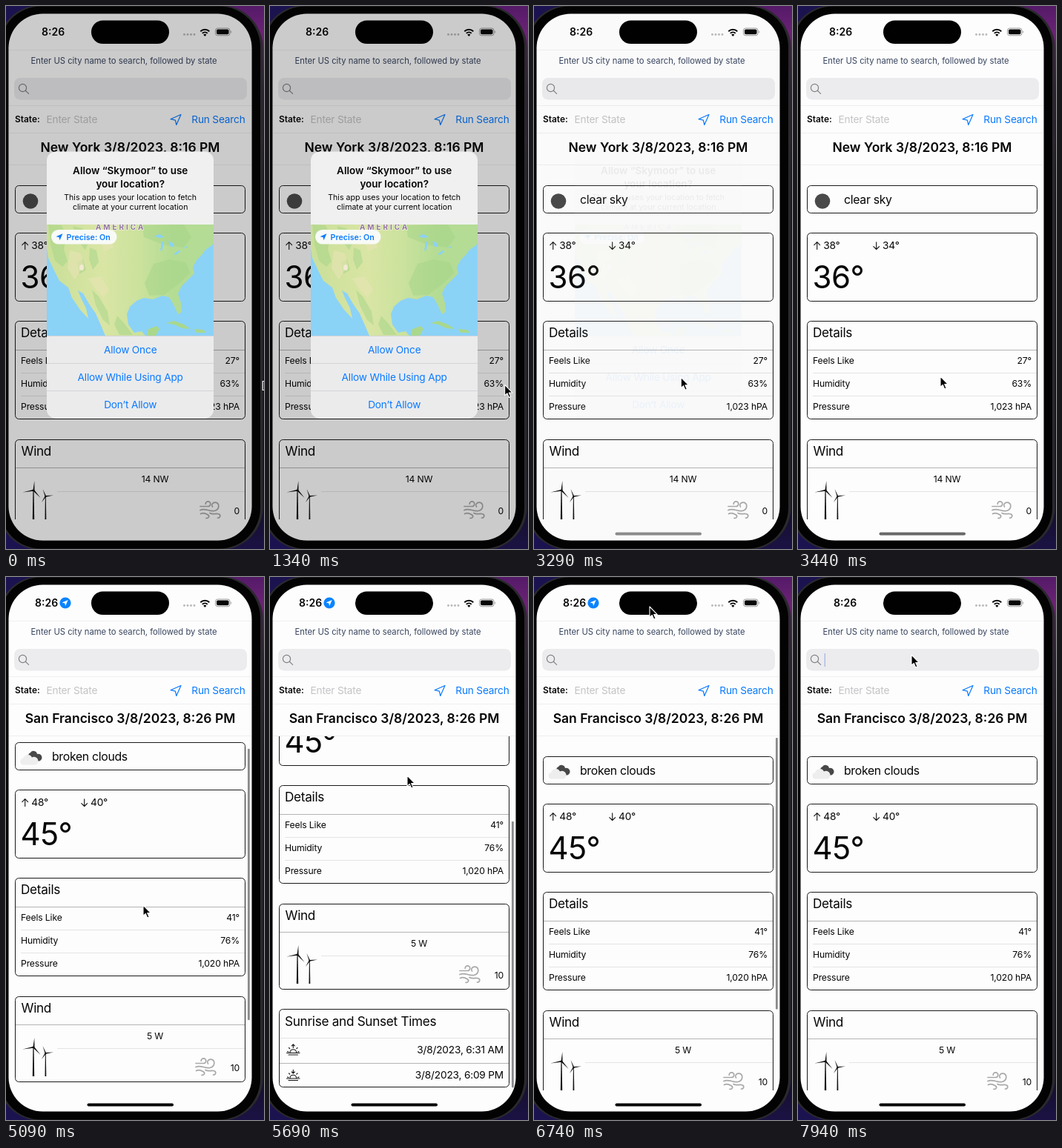
An HTML page for the animation above (8 s loop, 348 by 733 pixels).

```html
<!DOCTYPE html>
<html lang="en">
<head>
<meta charset="utf-8">
<title>Forecast app</title>
<style>
html, body { margin: 0; width: 100%; height: 100%; overflow: hidden; background: #160d2c; }
svg { display: block; width: 348px; height: 733px; }
text { font-family: Inter, Roboto, "Liberation Sans", sans-serif; fill: #050505; white-space: pre; }
.mid { text-anchor: middle; }
.end { text-anchor: end; }
.blue { fill: #0a7aff; }
.body { font-size: 13.7px; letter-spacing: -.2px; }
.small { font-size: 12.2px; letter-spacing: -.15px; }
.head { font-size: 17.2px; letter-spacing: -.3px; }
.sky { font-size: 15.8px; letter-spacing: -.3px; }
.big { font-size: 42px; letter-spacing: -.5px; }
.title { font-size: 17.5px; font-weight: 600; }
.clock { font-size: 14px; font-weight: 600; }
.card { fill: none; stroke: #1a1a1a; stroke-width: 1; }
.rule { stroke: #b4b4b6; stroke-width: 1; }
.thin { stroke: #e4e4e6; stroke-width: 1; }
.faint { stroke: #efeff0; stroke-width: 1; }
.ink { fill: none; stroke: #111; stroke-width: 1.1; stroke-linecap: round; stroke-linejoin: round; }
</style>
</head>
<body>
<svg viewBox="0 0 348 733">
  <defs>
    <linearGradient id="wall" x1="0" y1="0" x2="0" y2="1">
      <stop offset="0" stop-color="#541a68"/>
      <stop offset=".05" stop-color="#6b2274"/>
      <stop offset=".16" stop-color="#381740"/>
      <stop offset=".35" stop-color="#17121f"/>
      <stop offset=".9" stop-color="#130e22"/>
      <stop offset="1" stop-color="#1b1244"/>
    </linearGradient>
    <linearGradient id="land" x1="0" y1="0" x2="1" y2="0">
      <stop offset="0" stop-color="#c9df98"/>
      <stop offset=".35" stop-color="#d9e5a4"/>
      <stop offset=".55" stop-color="#cbe29d"/>
      <stop offset=".75" stop-color="#b4dc93"/>
      <stop offset="1" stop-color="#b4dc96"/>
    </linearGradient>
    <clipPath id="glass"><rect x="3.5" y="10.5" width="328" height="711" rx="46"/></clipPath>
    <clipPath id="listBox"><rect x="4" y="215" width="327" height="478"/></clipPath>
    <clipPath id="alertBox"><rect x="55" y="196.5" width="225" height="360" rx="12"/></clipPath>
    <clipPath id="mapBox"><rect x="55" y="295" width="225" height="150"/></clipPath>
    <path id="plane" d="M14 0L0 6.2L6.4 7.6L7.8 14Z"/>
  </defs>

  <rect width="348" height="733" fill="url(#wall)"/>
  <rect width="174" height="733" fill="#1b1350"/>
  <rect x="-11" y="-1" width="357.5" height="735" rx="57" fill="#2a292d"/>
  <rect x="-8" y=".5" width="351" height="732" rx="55" fill="#030303"/>

  <g clip-path="url(#glass)">
    <rect x="3" y="10" width="329" height="712" fill="#fdfdfd"/>
    <path class="faint" d="M4 59.5H331M4 134.5H331M4 171.5H331M4 214.5H331"/>

    <text x="33.5" y="78" font-size="11.25" style="fill:#38455f">Enter US city name to search, followed by state</text>
    <rect x="11" y="97" width="314" height="29.5" rx="8" fill="#ececee"/>
    <g fill="none" stroke="#828286" stroke-width="1.2" stroke-linecap="round">
      <circle cx="22.5" cy="110.5" r="5.1"/><path d="M26.3 114.3L30.6 118.4"/>
    </g>
    <rect id="caret" x="35.6" y="103" width="1.4" height="18" fill="#4a6be0"/>
    <text x="12" y="157" font-size="11.9" font-weight="600">State:</text>
    <text class="body" x="54.5" y="157.7" style="fill:#c4c4c7">Enter State</text>
    <use href="#plane" x="222" y="146.5" fill="none" stroke="#0a7aff" stroke-width="1.2" stroke-linejoin="round"/>
    <text class="body blue" x="250.3" y="157.7">Run Search</text>
    <text class="title mid" id="title" x="167.5" y="197"></text>

    <g clip-path="url(#listBox)"><g id="list">
      <rect class="card" x="12.5" y="242.5" width="310" height="37" rx="5"/>
      <circle id="moon" cx="33" cy="263.5" r="10.3" fill="#4a4a4a"/>
      <g id="clouds">
        <path d="M32 264a4.5 4.5 0 0 1 1-8a5 5 0 0 1 9 2a4.6 4.6 0 0 1 3 9.5H37Z" fill="#484848"/>
        <path d="M23 272.5a4.3 4.3 0 0 1 0-8.5a6.5 6.5 0 0 1 12-1.5a5 5 0 0 1 5.5 10Z" fill="#eeeeef"/>
      </g>
      <text class="sky" id="sky" x="62" y="267"></text>

      <rect class="card" x="12.5" y="306.5" width="310" height="92" rx="5"/>
      <path class="ink" d="M25.7 328.5V319M21.8 322.6L25.7 318.7L29.6 322.6M105.7 318.7V328.2M101.8 324.6L105.7 328.5L109.6 324.6"/>
      <text class="body" id="high" x="34.3" y="328.3"></text>
      <text class="body" id="low" x="114" y="328.3"></text>
      <text class="big" id="temp" x="19.5" y="380.7"></text>

      <rect class="card" x="12.5" y="425.5" width="310" height="132" rx="5"/>
      <text class="head" x="20" y="447">Details</text>
      <path class="rule" d="M13 464.5H322"/>
      <path class="thin" d="M20 495.5H322M20 526.5H322"/>
      <text class="small" x="20" y="483">Feels Like</text>
      <text class="small" x="20" y="514">Humidity</text>
      <text class="small" x="20" y="545">Pressure</text>
      <text class="small end" id="feels" x="315" y="483"></text>
      <text class="small end" id="humid" x="315" y="514"></text>
      <text class="small end" id="press" x="315" y="545"></text>

      <rect class="card" x="12.5" y="585.5" width="310" height="115" rx="5"/>
      <text class="head" x="20.5" y="607">Wind</text>
      <path class="rule" d="M13 623.5H322"/>
      <path class="thin" d="M69 655.5H322"/>
      <g fill="#111">
        <path d="M36.4 655L35.8 693H38.2L37.6 655Z"/>
        <path d="M36.4 653.5L38.3 641L38.5 653ZM37 652.8L22.5 656.5L37 654.7ZM36.7 654.7L46.5 664L38.2 653.3Z"/>
        <path d="M52.9 663L52.5 693H54.3L53.8 663Z"/>
        <path d="M52.7 662.3L49.5 652L54 661.2ZM53.5 661.1L64 660.5L53.7 662.7ZM54 662.4L48 670L52.6 661.5Z"/>
        <circle cx="37.2" cy="653.8" r="1.4"/><circle cx="53.4" cy="662" r="1.1"/>
      </g>
      <text class="small mid" id="wind" x="201" y="643"></text>
      <g id="gust" fill="none" stroke="#a9a9ab" stroke-width="1.7" stroke-linecap="round">
        <path d="M262 675.5H272.5a3.3 3.3 0 1 0-3.3-3.3"/>
        <path d="M262 680.5C269 677 274 683 281 681.5C288.5 680 288.5 670.5 282.5 670.2C278.5 670 276.5 673.5 278.5 676"/>
        <path d="M262.5 685.5C267 683 270 685.5 272.5 687C275 689 273 692 270 691.3"/>
        <path d="M275 684.5C279 687 283 684.5 287 685.8C290 687 289 691.5 285.5 691"/>
      </g>
      <text class="small end" id="speed" x="315" y="686"></text>

      <rect class="card" x="12.5" y="727.5" width="310" height="105" rx="5"/>
      <text class="head" x="20" y="749.5">Sunrise and Sunset Times</text>
      <path class="thin" d="M13 766.5H322"/>
      <path class="rule" d="M13 800.5H322"/>
      <g class="ink">
        <path d="M22.5 786.5H40M25 789H37.5M27 786a4.3 4.3 0 0 1 8.6 0M23.5 784.5l1.5.5M39 784.5l-1.5.5M25.5 779.5l1.2 1.2M37 779.5l-1.2 1.2"/>
        <path d="M31.3 779.5V775M29.3 776.8L31.3 774.8L33.3 776.8"/>
        <path d="M22.5 821H40M25 823.5H37.5M27 820.5a4.3 4.3 0 0 1 8.6 0M23.5 819l1.5.5M39 819l-1.5.5M25.5 814l1.2 1.2M37 814l-1.2 1.2"/>
        <path d="M31.3 809.3V813.8M29.3 812L31.3 814L33.3 812"/>
      </g>
      <text class="body end" x="315" y="786.7">3/8/2023, 6:31 AM</text>
      <text class="body end" x="315" y="821.3">3/8/2023, 6:09 PM</text>
    </g></g>
    <rect id="bar" x="326" width="2.8" rx="1.4" fill="#8b8b8d"/>

    <text class="clock" id="clock" y="40">8:26</text>
    <g id="badge">
      <circle cx="80" cy="35" r="7.6" fill="#0a84ff"/>
      <use href="#plane" transform="translate(75.6 31) scale(.58)" fill="#fff"/>
    </g>
    <g fill="#b9b9bb">
      <circle cx="240.5" cy="38.5" r="1.4"/><circle cx="245" cy="38.5" r="1.4"/>
      <circle cx="249.5" cy="38.5" r="1.4"/><circle cx="254" cy="38.5" r="1.4"/>
    </g>
    <g fill="none" stroke="#080808" stroke-width="2">
      <path d="M262.3 34.3a8.6 8.6 0 0 1 12 0M264.8 36.9a5 5 0 0 1 7 0"/>
      <path d="M268.3 41L266.2 38.7a3 3 0 0 1 4.2 0Z" fill="#080808" stroke="none"/>
    </g>
    <rect x="282.5" y="30" width="19.5" height="9.8" rx="3" fill="none" stroke="#999" stroke-width="1"/>
    <rect x="284" y="31.5" width="16.5" height="6.8" rx="1.7" fill="#080808"/>
    <path d="M303.3 33.3a2 2 0 0 1 0 3.4Z" fill="#999"/>
    <rect id="home" x="109.5" y="710.5" width="116.5" height="4" rx="2" fill="#050505"/>
    <rect id="dim" x="3" y="10" width="329" height="712"/>
  </g>
  <rect x="115" y="19.5" width="105" height="31.5" rx="15.7" fill="#010101"/>

  <g id="alert"><g clip-path="url(#alertBox)">
    <rect x="55" y="196" width="225" height="361" fill="#f0f0f0"/>
    <rect x="55" y="445" width="225" height="112" fill="#ebebec"/>
    <g font-size="13.5" font-weight="600" class="mid">
      <text x="167.7" y="227">Allow “Skymoor” to use</text>
      <text x="167.7" y="245">your location?</text>
    </g>
    <g font-size="10.6" class="mid">
      <text x="167.7" y="262">This app uses your location to fetch</text>
      <text x="167.7" y="275">climate at your current location</text>
    </g>
    <g clip-path="url(#mapBox)">
      <rect x="55" y="295" width="225" height="150" fill="#8bd2f7"/>
      <path fill="url(#land)" d="M50 290L54 320L57 340L64 355L72 371L84 380L89 394L100 410L111 422L108 408L101 394L97 384L104 388L112 402L121 415L128 431L134 445H188L183 439L173 441L165 430L163 416L167 406L176 398L186 394L198 396L211 391L220 393L226 403L232 416L237 413L236 401L232 388L237 378L246 369L254 361L252 353L257 343L264 336L269 329L278 323L284 314V290Z"/>
      <g fill="#a5d588" opacity=".5">
        <path d="M57 295L75 296L82 310L78 328L83 345L76 352L66 344L60 322Z"/>
        <path d="M90 297L103 300L112 318L107 330L98 318ZM113 326L122 330L125 346L117 356L112 342ZM96 345L104 342L108 356L99 362Z"/>
        <path d="M183 296L240 295L250 312L240 326L214 323L199 317L186 312ZM199 348L220 342L242 346L249 360L232 376L213 390L193 391L187 374Z"/>
        <path d="M116 383L125 392L137 412L140 431L131 424L121 404ZM150 418L160 429L171 444H153L146 430Z"/>
      </g>
      <g fill="#e8e5b4" opacity=".6">
        <path d="M86 330L101 334L105 350L93 369L83 354ZM111 368L128 365L139 383L131 394L119 380ZM122 300L140 303L145 326L132 331Z"/>
      </g>
      <ellipse cx="102" cy="353" rx="3" ry="4" fill="#f1ead0"/>
      <path fill="#8bd2f7" d="M200 311L207 308L214 312L207 313ZM210 318L213 318L211 329L208 331ZM219 317L225 320L227 325L222 325ZM226 335L233 330L236 331L229 336ZM238 327L245 324L245 326Z"/>
      <path d="M190 445L192 436L203 432L207 436L202 445ZM216 428L227 425L240 430L249 436L238 435L227 430ZM254 436L266 437L270 441L257 441Z" fill="#a9d88c"/>
      <text x="121" y="302" font-size="10" font-weight="600" letter-spacing="3" style="fill:#8a6a9c;stroke:#f4f1e8;stroke-width:1.5;paint-order:stroke">AMERICA</text>
      <rect x="61" y="302" width="88.5" height="19.5" rx="9.7" fill="#f8faf7"/>
      <use href="#plane" transform="translate(67.5 307.3) scale(.64)" fill="#0a7aff"/>
      <text class="blue" x="81.5" y="315.5" font-size="10.7" font-weight="600">Precise: On</text>
    </g>
    <rect id="tap" x="55" y="483" width="225" height="36.5"/>
    <path d="M55 445.5H280M55 482.5H280M55 519.5H280" stroke="#cfcfd1" stroke-width=".8"/>
    <text class="body blue mid" x="167.7" y="469">Allow Once</text>
    <text class="body blue mid" x="167.7" y="506">Allow While Using App</text>
    <text class="body blue mid" x="167.7" y="543">Don’t Allow</text>
  </g></g>

  <path id="edge" d="M348 506.5H346.3V518.5H348" fill="#222" stroke="#fff" stroke-width="1.2"/>
  <path id="cursor" d="M0 0V14.5L3.3 11.4L5.7 17L8.1 16L5.7 10.6H10.3Z" fill="#000" stroke="#fff" stroke-width="1.1" stroke-linejoin="round"/>
</svg>
<script>
const LOOP = 8000, STEP = 150, START = 1200, GRID = 2240;
const $ = id => document.getElementById(id);

const cities = [
  { sky: "clear sky", high: "38°", low: "34°", temp: "36°", feels: "27°", humid: "63%",
    press: "1,023 hPA", wind: "14 NW", speed: "0" },
  { sky: "broken clouds", high: "48°", low: "40°", temp: "45°", feels: "41°", humid: "76%",
    press: "1,020 hPA", wind: "5 W", speed: "10" }
];
const titles = ["New York 3/8/2023, 8:16 PM", "San Francisco 3/8/2023, 8:26 PM"];

// Each row: time, value (or x, y)
const tracks = {
  cursor: [[1200, 335, 508], [1490, 297, 515], [1790, 260, 517], [2090, 236, 512], [2240, 227, 507],
    [2390, 217, 505], [2840, 217, 505], [3440, 192, 500], [4040, 192, 500], [4490, 189, 540],
    [4790, 186, 470], [5090, 185, 443], [5390, 185, 335], [5690, 185, 268], [5990, 184, 225],
    [6290, 182, 178], [6590, 164, 60], [6740, 156, 40], [7040, 153, 105]],
  scroll: [[4940, 0], [5090, 19], [5240, 75], [5390, 117], [5540, 137], [5690, 144], [5840, 100],
    [5990, 20], [6140, -28], [6290, -17], [6440, -6], [6590, 0]],
  bar: [[4940, 0], [5090, 1], [6740, 1], [7040, 0]],
  alert: [[2840, 1], [2990, .6], [3140, .25], [3290, .06], [3440, 0]],
  home: [[2840, 0], [3440, .6], [3740, 1]],
  clock: [[3290, 48], [3440, 42], [3590, 39], [7490, 39], [7640, 48]],
  badge: [[3440, 0], [3590, 1], [7490, 1], [7640, 0]],
  caret: [[7340, 0], [7490, 1], [7790, 1], [7940, .4]]
};

function at(rows, t) {
  const i = rows.findIndex(r => r[0] > t);
  if (i === 0) return rows[0].slice(1);
  if (i < 0) return rows[rows.length - 1].slice(1);
  const a = rows[i - 1], b = rows[i], k = (t - a[0]) / (b[0] - a[0]);
  return a.slice(1).map((v, n) => v + (b[n + 1] - v) * k);
}

const set = (id, name, value) => $(id).setAttribute(name, value);
const show = (id, on) => set(id, "opacity", on ? 1 : 0);
function write(id, text) {
  if ($(id).textContent !== text) $(id).textContent = text;
}

// The bar shrinks while the list is pulled past either end
function placeBar(scroll) {
  const top = 217, view = 475, ratio = .772, max = 137;
  const over = Math.max(0, -scroll, scroll - max);
  const inside = Math.min(max, Math.max(0, scroll));
  set("bar", "y", top + inside * ratio + (scroll > max ? over : 0));
  set("bar", "height", view * ratio - over);
}

function draw(time) {
  const t = time < START ? 0 : Math.max(START, GRID + Math.floor((time - GRID) / STEP) * STEP);
  const val = name => at(tracks[name], t)[0];

  const loaded = t >= 3740 ? 1 : 0;
  for (const id in cities[loaded]) write(id, cities[loaded][id]);
  write("title", titles[t >= 4190 ? 1 : 0]);
  show("moon", !loaded);
  show("clouds", loaded);
  set("gust", "transform", `translate(${loaded ? -6 : 0} 0)`);

  const scroll = val("scroll");
  set("list", "transform", `translate(0 ${-scroll})`);
  placeBar(scroll);

  const alert = val("alert");
  set("alert", "opacity", alert);
  set("dim", "opacity", alert * .2);
  set("tap", "opacity", t >= 2540 && t < 2990 ? .1 : 0);
  set("clock", "x", val("clock"));
  for (const id of ["bar", "home", "badge", "caret"]) set(id, "opacity", val(id));

  const [x, y] = at(tracks.cursor, t);
  set("cursor", "transform", `translate(${x} ${y})`);
  show("cursor", t >= START);
  show("edge", t < START);
}

const begin = performance.now();
function tick() {
  draw((performance.now() - begin) % LOOP);
  requestAnimationFrame(tick);
}
tick();
</script>
</body>
</html>
```
